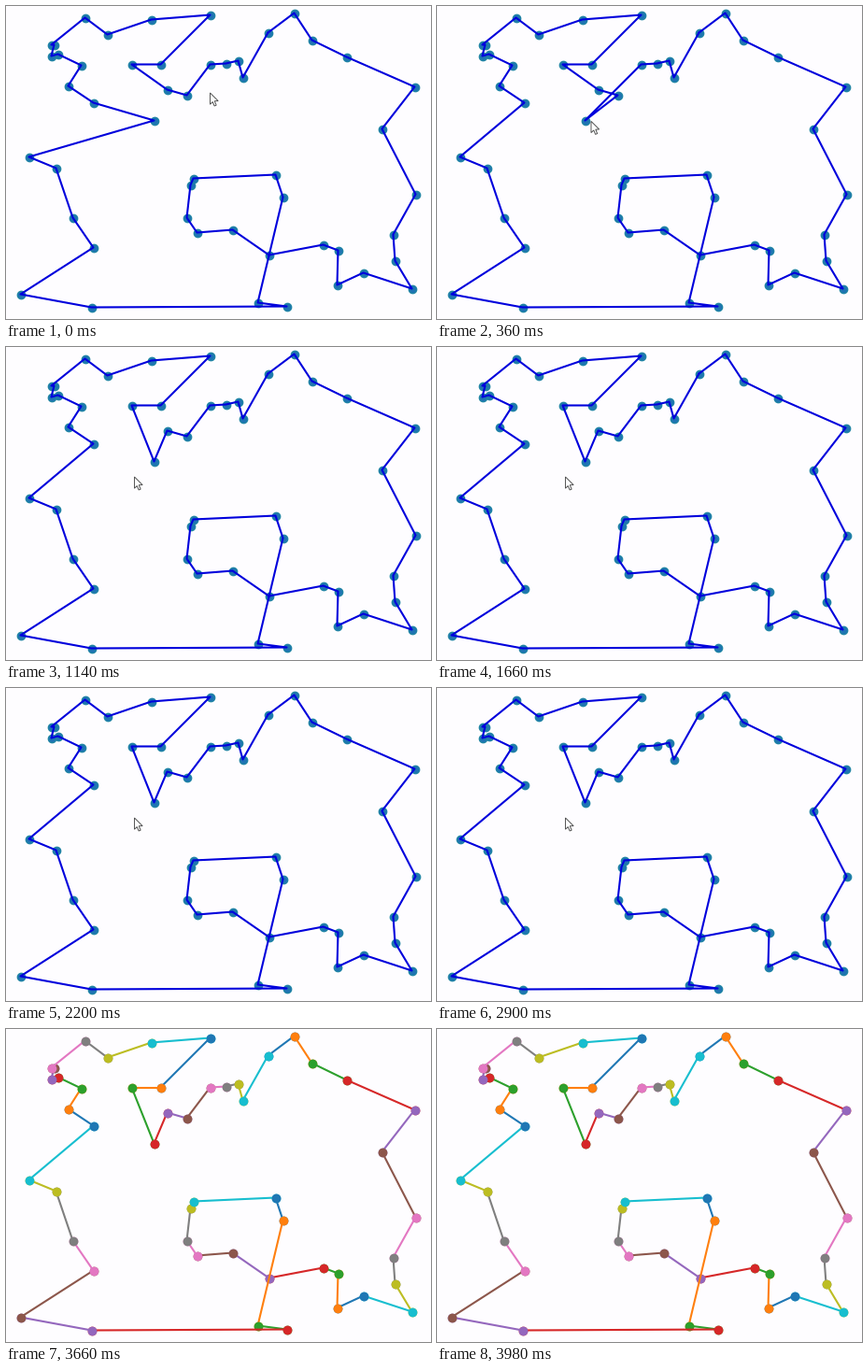
A matplotlib script for the animation above (4000 ms loop, 455 by 335 pixels).

```python
import matplotlib.pyplot as plt
import numpy as np
from matplotlib.animation import FuncAnimation

W, H, DPI = 455, 335, 100
STEP, LOOP = 20, 4000
MOVE_AT, SWAP_AT, COLOR_AT = 340, 860, 3580   # ms
GLIDE = (80, 540)                             # cursor travel, ms

# Cities in the order of the finished tour
CITIES = np.array([
    (281, 29), (309, 8), (328, 37), (365, 55), (438, 87), (403, 132),
    (439, 202), (415, 245), (417, 273), (435, 303), (383, 286), (355, 299),
    (356, 262), (340, 256), (282, 267), (243, 240), (205, 243), (194, 227),
    (198, 192), (201, 185), (289, 181), (297, 205), (270, 318), (301, 322),
    (92, 323), (16, 309), (94, 259), (72, 227), (54, 174), (25, 162),
    (94, 104), (67, 86), (81, 64), (56, 52), (49, 54), (52, 42),
    (49, 42), (85, 13), (109, 31), (156, 15), (219, 10), (166, 63),
    (135, 63), (159, 123), (173, 90), (194, 96), (219, 63), (236, 62),
    (249, 59), (254, 77)], float)
N = len(CITIES)
LOOSE = 43   # the city that the search relocates


def tour_with(after):
    """Closed tour with the loose city visited right after another one."""
    order = [i for i in range(N) if i != LOOSE]
    order.insert(order.index(after) + 1, LOOSE)
    return CITIES[order + order[:1]]


def arrow():
    """Pointer outline: one half mirrored on its axis, then tilted."""
    half = np.array([0, 11.3 + 4.7j, 9.9 + 1.1j, 14.7 + 1.1j])
    shape = np.r_[half, half[:0:-1].conj()] * np.exp(1j * np.radians(67.5))
    return np.column_stack([shape.real, shape.imag])


def smooth(u):
    u = np.clip(u, 0, 1)
    return u * u * (3 - 2 * u)


TOURS = [tour_with(29), tour_with(LOOSE + 2), tour_with(LOOSE - 1)]
ARROW = arrow()
CURSOR_FROM, CURSOR_TO = np.array([219, 93.5]), np.array([138, 139.5])

fig = plt.figure(figsize=(W / DPI, H / DPI), dpi=DPI, facecolor="#fefdff")
ax = fig.add_axes([0, 0, 1, 1])
ax.set(xlim=(0.5, W + 0.5), ylim=(H + 0.5, 0.5))
ax.axis("off")

dots = ax.scatter(*CITIES.T, s=36, fc="#1f73b4", ec="#1f84a4", lw=1, zorder=1)
path, = ax.plot([], [], color="#0000dc", lw=1.5, zorder=2)
cursor, = ax.fill(*ARROW.T, fc="white", ec="#484848", lw=0.65, zorder=4)

closed = np.vstack([CITIES, CITIES[:1]])
edges = [ax.plot(*closed[i:i + 2].T, "o-", color=f"C{i % 10}", lw=1.5, ms=6,
                 zorder=3)[0] for i in range(N)]


def draw(k):
    t = k * STEP
    colored = t >= COLOR_AT
    path.set_data(*TOURS[(t >= MOVE_AT) + (t >= SWAP_AT)].T)
    u = smooth((t - GLIDE[0]) / (GLIDE[1] - GLIDE[0]))
    cursor.set_xy(ARROW + CURSOR_FROM + (CURSOR_TO - CURSOR_FROM) * u)
    for art in (dots, path, cursor):
        art.set_visible(not colored)
    for edge in edges:
        edge.set_visible(colored)
    return [dots, path, cursor, *edges]


anim = FuncAnimation(fig, draw, frames=LOOP // STEP, interval=STEP,
                     repeat=True, repeat_delay=0, blit=False)
plt.show()
```
